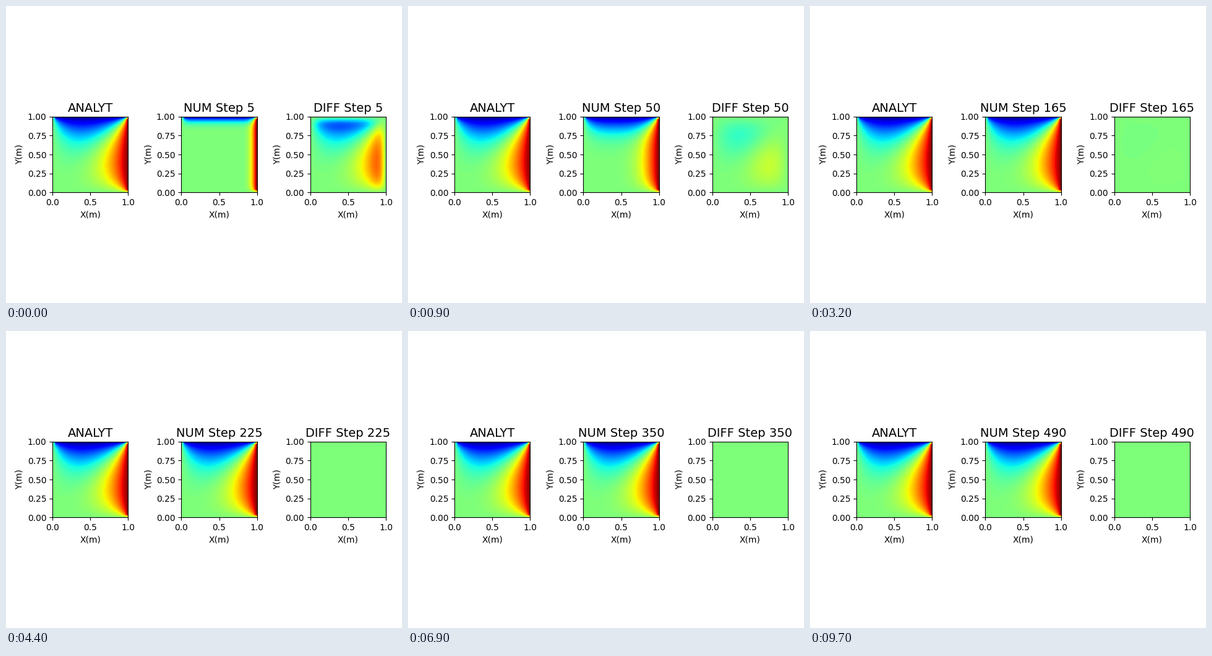
Animation of 640 by 480 pixels, one loop 9800 ms. Source, as a matplotlib script:

```python
import numpy as np
import matplotlib.pyplot as plt
from matplotlib.animation import FuncAnimation

W, H, DPI = 640, 480, 100
FRAMES, INTERVAL, STRIDE = 98, 100, 5
N = 25
LEVELS = np.linspace(-1, 1, 150)

axis = np.linspace(0, 1, N)
X, Y = np.meshgrid(axis, axis)


def with_edges(field):
    """Fix the walls: -1 on top, +1 on the right, 0 elsewhere and in corners."""
    field[0, :] = field[:, 0] = 0
    field[-1, :] = -1
    field[:, -1] = 1
    field[-1, 0] = field[-1, -1] = field[0, -1] = 0
    return field


def wall_series(s, t, terms=400):
    """Laplace solution for a unit wall at s = 1 and zero on the other walls."""
    total = np.zeros_like(s)
    for n in range(1, terms, 2):
        k = n * np.pi
        ratio = np.exp(k * (s - 1)) * (1 - np.exp(-2 * k * s)) / (1 - np.exp(-2 * k))
        total += 4 / k * np.sin(k * t) * ratio
    return total


def relax(field):
    """One Jacobi sweep."""
    new = field.copy()
    new[1:-1, 1:-1] = (field[2:, 1:-1] + field[:-2, 1:-1]
                       + field[1:-1, 2:] + field[1:-1, :-2]) / 4
    return new


def solve():
    field = with_edges(np.zeros((N, N)))
    states = []
    for step in range(1, FRAMES * STRIDE + 1):
        field = relax(field)
        if step % STRIDE == 0:
            states.append(field)
    return states


exact = with_edges(wall_series(X, Y) - wall_series(Y, X))
states = solve()


def fill(ax, field):
    return ax.contourf(X, Y, field, levels=LEVELS, cmap="jet")


fig, panels = plt.subplots(1, 3, figsize=(W / DPI, H / DPI), dpi=DPI,
                           facecolor="white")
for ax in panels:
    ax.set(xlim=(0, 1), ylim=(0, 1), xlabel="X(m)", ylabel="Y(m)",
           xticks=[0, 0.5, 1], yticks=[0, 0.25, 0.5, 0.75, 1], aspect="equal")
fill(panels[0], exact)
panels[0].set_title("ANALYT", fontsize=14)
fig.tight_layout()
fills = []


def update(i):
    while fills:
        fills.pop().remove()
    num = states[i]
    for ax, name, field in zip(panels[1:], ("NUM", "DIFF"), (num, exact - num)):
        fills.append(fill(ax, field))
        ax.set_title(f"{name} Step {(i + 1) * STRIDE}", fontsize=14)
    return []


anim = FuncAnimation(fig, update, frames=FRAMES, interval=INTERVAL,
                     init_func=lambda: update(0), repeat=True, repeat_delay=0)
plt.show()
```
